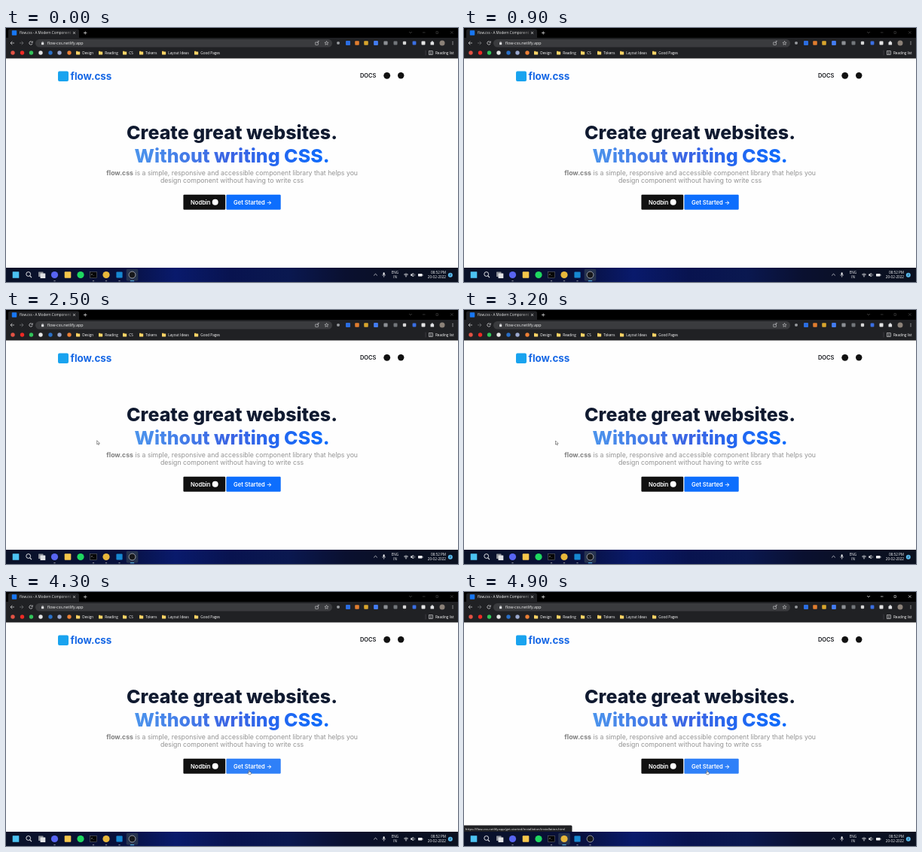
Write an HTML page with a canvas that moves like this. It is 600 px wide and 338 px high and loops after 5 s.

```html
<!DOCTYPE html>
<html lang="en">
<head>
<meta charset="utf-8">
<title>flow.css</title>
<style>
html, body { margin: 0; width: 100%; height: 100%; overflow: hidden; background: #000; }
canvas { display: block; width: 600px; height: 338px; }
</style>
</head>
<body>
<canvas id="stage"></canvas>
<script>
const W = 600, H = 338, LOOP = 5000, STEP = 100;
const FOCUS_AT = 4500, HOVER_AT = 4100;
const UI = '"Open Sans", "Noto Sans", sans-serif';
const PAGE = 'Inter, sans-serif';

const canvas = document.getElementById('stage');
const ctx = canvas.getContext('2d');
const dpr = window.devicePixelRatio || 1;
canvas.width = W * dpr;
canvas.height = H * dpr;
ctx.scale(dpr, dpr);

function rect(x, y, w, h, color, r = 0) {
  ctx.fillStyle = color;
  ctx.beginPath();
  ctx.roundRect(x, y, w, h, r);
  ctx.fill();
}

function dot(x, y, r, color) {
  ctx.fillStyle = color;
  ctx.beginPath();
  ctx.arc(x, y, r, 0, Math.PI * 2);
  ctx.fill();
}

function square(x, y, size, color, r = 0.7) {
  rect(x - size / 2, y - size / 2, size, size, color, r);
}

function ring(x, y, r, color, lw = 0.7, from = 0, to = Math.PI * 2) {
  ctx.strokeStyle = color;
  ctx.lineWidth = lw;
  ctx.beginPath();
  ctx.arc(x, y, r, from, to);
  ctx.stroke();
}

function line(points, color, lw = 0.7) {
  ctx.strokeStyle = color;
  ctx.lineWidth = lw;
  ctx.beginPath();
  points.forEach(([x, y], i) => i ? ctx.lineTo(x, y) : ctx.moveTo(x, y));
  ctx.stroke();
}

function frame(x, y, w, h, color, lw = 0.6) {
  ctx.strokeStyle = color;
  ctx.lineWidth = lw;
  ctx.strokeRect(x, y, w, h);
}

function text(str, x, y, size, color, family = UI, weight = 400, align = 'left') {
  ctx.font = `${weight} ${size}px ${family}`;
  ctx.textAlign = align;
  ctx.textBaseline = 'alphabetic';
  ctx.fillStyle = color;
  ctx.fillText(str, x, y);
  return ctx.measureText(str).width;
}

function fade(x0, x1, ...colors) {
  const g = ctx.createLinearGradient(x0, 0, x1, 0);
  colors.forEach((c, i) => g.addColorStop(i / (colors.length - 1), c));
  return g;
}

function folder(x, y) {
  rect(x, y - 2.2, 2.4, 2, '#e9b93f', 0.3);
  rect(x, y - 1.6, 5.2, 4, '#fbd568', 0.4);
}

function tabStrip(focused) {
  rect(0, 0, W, 14, '#000');
  rect(3, 1.5, 94, 14, '#202124', 2.5);
  square(11, 6.5, 6.4, '#1877f2');
  const ink = focused ? '#fff' : '#e8e8e8';
  text('flow.css - A Modern Component', 18, 8.3, 4.6, fade(18, 86, ink, ink, ink, ink, ink, '#777'), UI, 500);
  line([[89, 5], [92, 8]], ink);
  line([[92, 5], [89, 8]], ink);
  line([[103, 6.5], [107.4, 6.5]], ink);
  line([[105.2, 4.3], [105.2, 8.7]], ink);

  const ctl = focused ? '#e8e8e8' : '#4a4a4a';
  line([[535, 5], [537, 7], [539, 5]], ctl);
  line([[553, 6], [556.5, 6]], ctl);
  frame(571, 4.8, 2.5, 2.5, ctl);
  line([[590, 4.3], [593.4, 7.7]], ctl);
  line([[593.4, 4.3], [590, 7.7]], ctl);
}

function toolbar() {
  const ink = '#e2e3e5', dim = '#77797c';
  rect(0, 13, W, 28, '#202124');
  line([[11, 20], [6, 20]], ink);
  line([[8.3, 17.7], [6, 20], [8.3, 22.3]], ink);
  line([[18, 20], [23, 20]], dim);
  line([[20.7, 17.7], [23, 20], [20.7, 22.3]], dim);
  ring(33, 20, 2.2, ink, 0.7, 0.3, 5.5);
  line([[35.3, 17.5], [35.3, 19.3], [33.5, 19.3]], ink);

  rect(39, 15, 394, 10.4, '#3a3b3e', 5.2);
  rect(47, 19.3, 3.2, 2.9, ink, 0.3);
  ring(48.6, 19.3, 1, ink, 0.5, Math.PI, 0);
  text('flow-css.netlify.app', 54.8, 22.1, 5.4, '#f2f2f2');
  frame(410.8, 19, 3.8, 3.4, ink, 0.5);
  line([[412.6, 20.3], [415.5, 17.4], [413.7, 17.4]], ink, 0.5);
  star(425.5, 20.2, 2.7);

  const extensions = [
    [441, '#9a9da1', 3.5], [454, '#2b6de0', 6], [466, '#e07d2f', 5.5],
    [478, '#d8a52d', 5.5], [491, '#437cf0', 5.8], [504, '#8c8f94', 5.2],
    [517, '#73777b', 5], [529, '#d5d5d5', 4.3], [542, '#3a6fe3', 4.8],
    [554, '#e4e4e4', 5]
  ];
  extensions.forEach(([x, c, s]) => square(x, 20, s, c, 1));
  rect(563.5, 18.5, 4.6, 4, ink, 0.5);
  dot(565.8, 18.2, 1, ink);
  dot(579, 20, 3.5, '#8b8178');
  [-1.8, 0, 1.8].forEach(d => dot(593, 20 + d, 0.55, ink));
}

function star(x, y, r) {
  const pts = Array.from({ length: 11 }, (_, i) => {
    const a = i * Math.PI / 5 - Math.PI / 2, k = i % 2 ? r * 0.45 : r;
    return [x + Math.cos(a) * k, y + Math.sin(a) * k];
  });
  line(pts, '#e2e3e5', 0.5);
}

function bookmarks() {
  const sites = [[9, '#e25345'], [21.5, '#ee2a25'], [33.5, '#32c45a'], [46, '#e6e6e6'],
    [59, '#2a70c8'], [71, '#9caad0'], [84, '#ed8035']];
  sites.forEach(([x, c]) => dot(x, 33, 2.7, c));
  const folders = [[93, 'Design'], [123, 'Reading'], [155, 'CS'], [177, 'Tokens'],
    [207, 'Layout Ideas'], [250, 'Good Pages']];
  folders.forEach(([x, label]) => {
    folder(x, 33);
    text(label, x + 8.3, 34.7, 4.65, '#fff', UI, 500);
  });
  line([[557, 29.5], [557, 36.5]], '#55575a', 0.5);
  frame(561.5, 30.7, 4.8, 4.8, '#e4e5e7');
  [32, 33.2, 34.4].forEach(y => line([[562.7, y], [565.2, y]], '#e4e5e7', 0.45));
  text('Reading list', 570, 34.7, 4.6, '#fff', UI, 500);
}

function page(hover) {
  rect(0, 40.5, W, 279, '#fefefe');
  rect(69, 57.5, 14, 13.5, '#19a3ef', 2);
  text('flow.css', 85.6, 68.7, 13.4, '#1768e5', PAGE, 700);
  text('DOCS', 470, 66, 7.4, '#111318', PAGE, 600);
  dot(505.7, 63.3, 4.4, '#111');
  dot(524.2, 63.3, 4.2, '#111');

  text('Create great websites.', 300, 148, 25, '#101a30', PAGE, 800, 'center');
  text('Without writing CSS.', 300, 178.5, 25, fade(171, 429, '#4c94ec', '#3b64e4', '#0b6bfd'), PAGE, 800, 'center');
  const gray = '#939393';
  const bold = text('flow.css', 133.3, 195.8, 8.73, '#808080', PAGE, 700);
  text(' is a simple, responsive and accessible component library that helps you',
    133.3 + bold, 195.8, 8.73, gray, PAGE);
  text('design component without having to write css', 300, 206.4, 8.75, gray, PAGE, 400, 'center');

  rect(235.4, 221.8, 55.8, 20, '#111', 1.2);
  text('Nodbin', 245, 234.7, 7.6, '#fff', PAGE, 600);
  dot(277.7, 231.8, 4, '#fff');
  rect(292.4, 221.8, 72.3, 20, hover ? '#2f80f8' : '#0d6efd', 1.2);
  text('Get Started →', 302, 234.7, 7.6, '#fff', PAGE, 600);
}

function statusBubble() {
  rect(0, 310.5, 143.5, 9, '#202124', [0, 1.5, 0, 0]);
  text('https://flow-css.netlify.app/get-started/installation/installation.html',
    1.8, 316.8, 4.25, '#f0f0f0');
}

function taskbar(focused) {
  rect(0, 319, W, 19, fade(0, W, '#0a1228', '#0a1230', '#08103c', '#091a6c', '#08134f',
    '#0a1850', '#0a1030', '#0a1022', '#0b1120'));
  const active = focused ? 133 : 167.5;
  rect(active - 7.8, 320.8, 15.6, 15.8, '#26334f', 1.8);

  square(13, 328.5, 8.6, '#4cc2f1', 0.4);
  ring(29.7, 327.5, 2.9, '#e5e7ea', 1);
  line([[31.8, 329.8], [34, 332.2]], '#e5e7ea', 1.1);
  rect(43, 324.5, 6.5, 6.5, '#8a8e96', 0.5);
  rect(45.5, 326.5, 6.8, 6.5, '#e0e2e5', 0.5);
  dot(64.5, 328.5, 4.6, '#5865f2');
  square(82, 328.5, 8.6, '#f5c64b', 1);
  dot(99, 328.5, 4.6, '#1ed760');
  rect(111.5, 324.3, 9.2, 8.4, '#050505', 0.8);
  frame(111.5, 324.3, 9.2, 8.4, '#737780', 0.5);
  text('>_', 112.7, 329, 3.8, '#e6e6e6', '"DejaVu Sans Mono", monospace');
  dot(133, 328.5, 4.6, '#e8b73b');
  square(150.5, 328.5, 8.2, '#1688d1', 1);
  dot(167.5, 328.5, 4.4, '#17181b');
  ring(167.5, 328.5, 4.4, '#c9cbce', 0.7);
  [64.5, 116, 133, 150.5, 167.5].forEach(x => {
    const on = x === active, w = on ? 5.5 : 2.4;
    rect(x - w / 2, 336, w, 1, on ? '#55b8ee' : '#8d929b', 0.5);
  });

  const ink = '#f4f5f7';
  const label = (str, x, y, align) => text(str, x, y, 4.65, ink, UI, 500, align);
  line([[488.2, 329.4], [490.5, 327.2], [492.8, 329.4]], ink);
  rect(500.6, 325.3, 2, 3.8, ink, 1);
  ring(501.6, 328, 2, ink, 0.5, 0, Math.PI);
  line([[501.6, 330], [501.6, 331.8]], ink, 0.5);
  label('ENG', 516.5, 327.2, 'center');
  label('IN', 516.5, 333.4, 'center');
  [1.2, 2.6, 4].forEach(r => ring(531, 331, r, ink, 0.7, Math.PI * 1.25, Math.PI * 1.75));
  dot(531, 330.8, 0.6, ink);
  rect(537.3, 327.4, 1.8, 2.4, ink);
  line([[538.3, 328.6], [540.3, 326.3], [540.3, 330.9], [538.3, 328.6]], ink);
  ring(540.3, 328.6, 2.3, ink, 0.5, -0.8, 0.8);
  rect(547, 327, 5.5, 3.4, ink, 0.6);
  rect(552.7, 328, 0.7, 1.4, ink);
  label('08:52 PM', 584, 327.2, 'right');
  label('20-02-2022', 584, 333.4, 'right');
  dot(589.8, 328.7, 3, '#5bbdf0');
  text('2', 589.8, 330.3, 4.2, '#10283d', UI, 600, 'center');
}

// Pointer keys: time, x, y
const path = [[2300, 108, 165], [2500, 120.7, 173.7], [3200, 121.5, 174],
  [3700, 278, 206], [3900, 302.7, 216.6], [4200, 322.8, 237.5]];

function pointerAt(t) {
  if (t < path[0][0]) return null;
  const i = path.findIndex(k => k[0] > t);
  if (i < 0) return path[path.length - 1].slice(1);
  const [t0, x0, y0] = path[i - 1], [t1, x1, y1] = path[i];
  const u = (t - t0) / (t1 - t0);
  const e = u * u * (3 - 2 * u);
  return [x0 + (x1 - x0) * e, y0 + (y1 - y0) * e];
}

const arrow = new Path2D('M0 0V5.1L1.2 4 2 5.8 2.9 5.4 2.1 3.7H3.7Z');
const hand = new Path2D('M-.6 .3Q0-.5 .6 .3V2L2.2 2.4Q2.8 2.6 2.7 3.2L2.2 5.3H-.6L-2.1 3.3Q-1.9 2.4-.6 3.2Z');

function pointer(t, hover) {
  const p = pointerAt(t);
  if (!p) return;
  ctx.save();
  ctx.translate(p[0], p[1]);
  ctx.lineWidth = 0.55;
  ctx.lineJoin = 'round';
  ctx.fillStyle = '#fff';
  ctx.strokeStyle = '#444';
  const shape = hover ? hand : arrow;
  ctx.fill(shape);
  ctx.stroke(shape);
  ctx.restore();
}

function draw(t) {
  const focused = t >= FOCUS_AT, hover = t >= HOVER_AT;
  tabStrip(focused);
  toolbar();
  bookmarks();
  page(hover);
  if (focused) statusBubble();
  taskbar(focused);
  pointer(t, hover);
}

const start = performance.now();
function tick() {
  const t = (performance.now() - start) % LOOP;
  draw(Math.floor(t / STEP) * STEP);
  requestAnimationFrame(tick);
}
tick();
</script>
</body>
</html>
```
